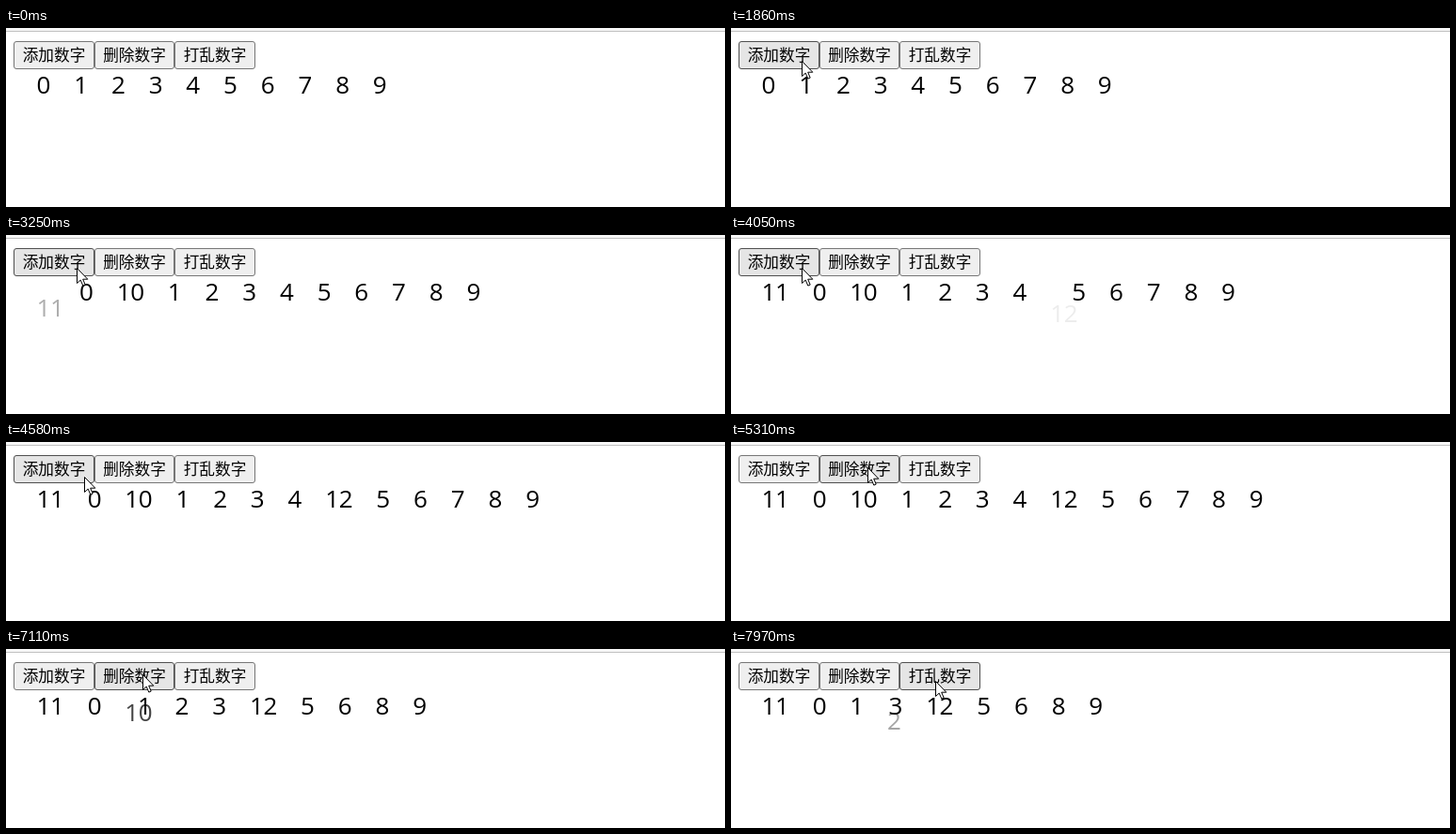
Animation, 764 px wide and 191 px high, one loop 8000 ms. Source, as an HTML page with a canvas:

```html
<!DOCTYPE html>
<html lang="zh">
<head>
<meta charset="utf-8">
<style>
  html, body { margin: 0; width: 100%; height: 100%; overflow: hidden; background: #fff; }
  canvas { display: block; }
</style>
</head>
<body>
<canvas id="stage" width="764" height="191"></canvas>
<script>
const ctx = document.getElementById('stage').getContext('2d');
const LOOP = 8000, DURATION = 500, ENTER_DELAY = 18;
const DIGIT = 14.4, GAP = 25.3, LEFT = 32.8, BASELINE = 70, DROP = 25;

const buttons = [
  { x: 8, w: 86, label: '添加数字' },
  { x: 94, w: 85, label: '删除数字' },
  { x: 179, w: 86, label: '打乱数字' },
];

// Each edit either inserts a value at an index or removes it.
const edits = [
  { at: 1985, down: 1930, add: 10, index: 1 },
  { at: 2980, down: 2920, add: 11, index: 0 },
  { at: 3922, down: 3850, add: 12, index: 7 },
  { at: 5283, down: 5205, remove: 7 },
  { at: 6120, down: 6040, remove: 4 },
  { at: 6885, down: 6780, remove: 10 },
  { at: 7588, down: 7510, remove: 2 },
];

// Pointer keyframes: time, x, y
const pointerPath = [
  [1060, 651, 178], [1230, 490, 146], [1400, 300, 106], [1540, 146, 69],
  [1660, 102, 48], [1850, 75, 35], [4560, 75, 35], [4640, 104, 43],
  [4760, 138, 30], [4850, 145, 27], [7680, 145, 27], [7930, 217, 34],
];

const arrow = [[0, 0], [0, 16], [3.7, 12.6], [6.3, 18.6], [8.7, 17.6], [6.2, 11.7], [11.3, 11.7]];

const clamp = v => Math.min(1, Math.max(0, v));

function bezier(x1, y1, x2, y2) {
  const curve = (a, b, s) => 3 * a * s * (1 - s) ** 2 + 3 * b * s * s * (1 - s) + s ** 3;
  return x => {
    let lo = 0, hi = 1;
    for (let i = 0; i < 24; i++) {
      const mid = (lo + hi) / 2;
      if (curve(x1, x2, mid) < x) lo = mid; else hi = mid;
    }
    return curve(y1, y2, (lo + hi) / 2);
  };
}
const ease = bezier(0.25, 0.1, 0.25, 1);
const easeIn = bezier(0.42, 0, 1, 1);

function layout(list) {
  const places = new Map();
  let x = LEFT;
  for (const n of list) {
    places.set(n, x);
    x += String(n).length * DIGIT + GAP;
  }
  return places;
}

const initial = Array.from({ length: 10 }, (_, i) => i);
const start = layout(initial);
let list = initial;
for (const edit of edits) {
  edit.before = layout(list);
  list = list.filter(n => n !== edit.remove);
  if (edit.add !== undefined) list.splice(edit.index, 0, edit.add);
  edit.after = layout(list);
}

function drawNumber(n, x, drop = 0, alpha = 1) {
  ctx.globalAlpha = alpha;
  [...String(n)].forEach((d, i) => ctx.fillText(d, x + DIGIT * (i + 0.5), BASELINE + drop));
  ctx.globalAlpha = 1;
}

function drawNumbers(t) {
  ctx.font = '26px "Open Sans", "Noto Sans", sans-serif';
  ctx.textAlign = 'center';
  ctx.fillStyle = '#000';
  const edit = edits.filter(e => e.at <= t).pop();
  if (!edit) {
    start.forEach((x, n) => drawNumber(n, x));
    return;
  }
  const elapsed = t - edit.at;
  const shift = ease(clamp(elapsed / DURATION));
  edit.after.forEach((x, n) => {
    if (n === edit.add) {
      const p = easeIn(clamp((elapsed - ENTER_DELAY) / DURATION));
      drawNumber(n, x, DROP * (1 - p), p);
    } else {
      const from = edit.before.get(n);
      drawNumber(n, from + (x - from) * shift);
    }
  });
  if (edit.remove !== undefined && elapsed < DURATION) {
    const p = easeIn(elapsed / DURATION);
    drawNumber(edit.remove, edit.before.get(edit.remove), DROP * p, 1 - p);
  }
}

function pointerAt(t) {
  if (t < pointerPath[0][0]) return null;
  const next = pointerPath.findIndex(k => k[0] > t);
  if (next < 0) return pointerPath[pointerPath.length - 1].slice(1);
  const [t0, x0, y0] = pointerPath[next - 1], [t1, x1, y1] = pointerPath[next];
  const p = (t - t0) / (t1 - t0);
  return [x0 + (x1 - x0) * p, y0 + (y1 - y0) * p];
}

function drawButtons(t, pointer) {
  const pressed = edits.some(e => t >= e.down && t < e.at);
  ctx.font = '16.67px "Noto Sans CJK SC", "Noto Sans CJK", sans-serif';
  ctx.textAlign = 'center';
  for (const { x, w, label } of buttons) {
    const hover = pointer && pointer[0] >= x && pointer[0] < x + w && pointer[1] >= 14 && pointer[1] < 44;
    const [fill, border] = !hover ? ['#efefef', '#767676']
      : pressed ? ['#f5f5f5', '#8d8d8d'] : ['#e5e5e5', '#4f4f4f'];
    ctx.beginPath();
    ctx.roundRect(x + 0.5, 14.5, w - 1, 29, 2.5);
    ctx.fillStyle = fill;
    ctx.fill();
    ctx.lineWidth = 1;
    ctx.strokeStyle = border;
    ctx.stroke();
    ctx.fillStyle = '#000';
    ctx.fillText(label, x + w / 2, 35);
  }
}

function drawPointer([x, y]) {
  ctx.beginPath();
  arrow.forEach(([dx, dy]) => ctx.lineTo(Math.round(x) + 0.5 + dx, Math.round(y) + 0.5 + dy));
  ctx.closePath();
  ctx.fillStyle = '#fff';
  ctx.fill();
  ctx.lineWidth = 1;
  ctx.strokeStyle = '#000';
  ctx.stroke();
}

function draw(t) {
  ctx.fillStyle = '#fff';
  ctx.fillRect(0, 0, 764, 191);
  ctx.fillStyle = '#f8f8f8';
  ctx.fillRect(0, 0, 764, 3);
  ctx.fillStyle = '#c0c0c0';
  ctx.fillRect(0, 3, 764, 1);
  const pointer = pointerAt(t);
  drawButtons(t, pointer);
  drawNumbers(t);
  if (pointer) drawPointer(pointer);
}

const origin = performance.now();
function tick() {
  draw((performance.now() - origin) % LOOP);
  requestAnimationFrame(tick);
}
tick();
</script>
</body>
</html>
```
